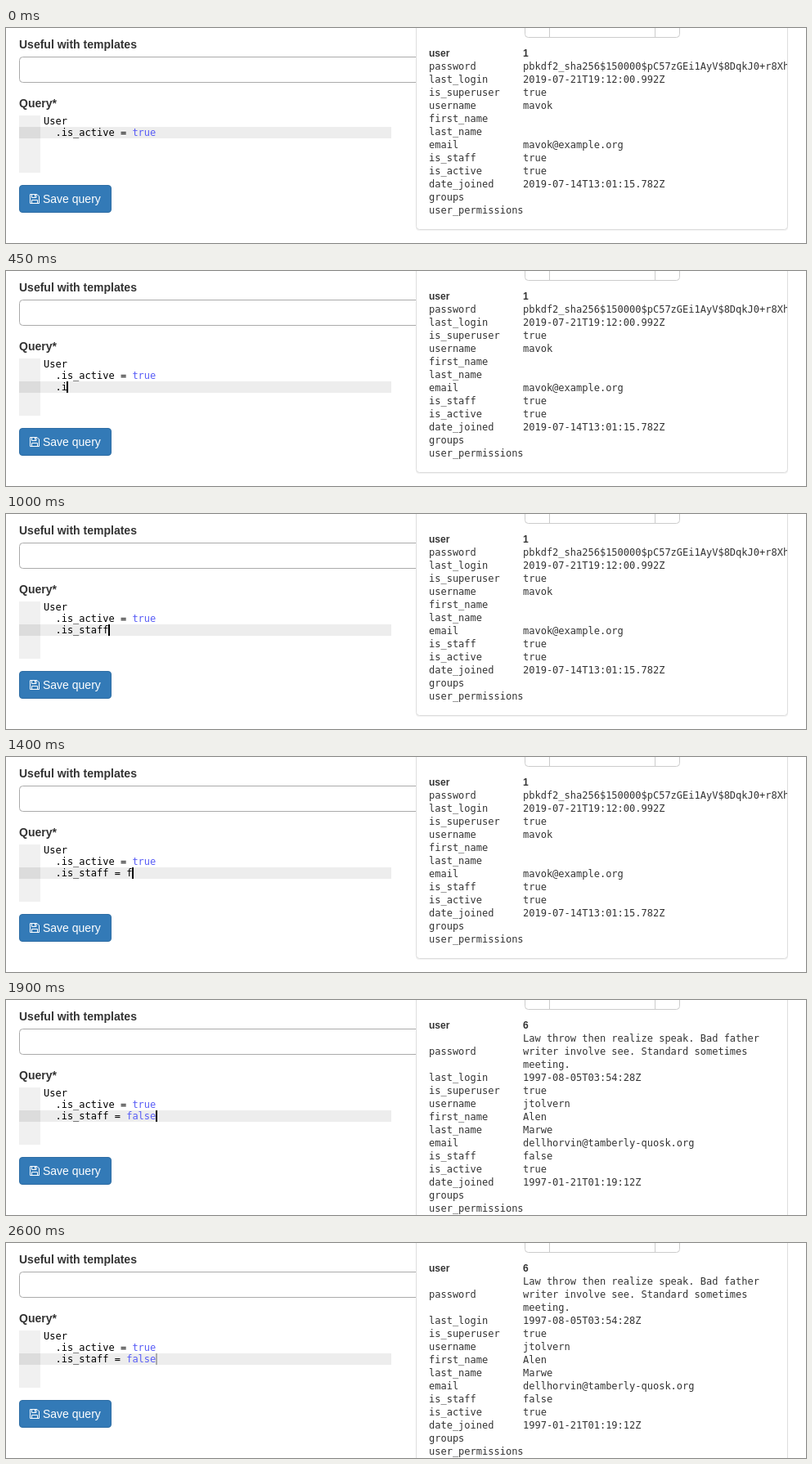
Write an HTML page that moves like this. It is 978 px wide and 263 px high and loops after 3300 ms.

```html
<!DOCTYPE html>
<html lang="en">
<head>
<meta charset="utf-8">
<title>Query editor</title>
<style>
  html, body { margin: 0; width: 100%; height: 100%; overflow: hidden; background: #fff; }
  svg { display: block; width: 100%; height: 100%; }
  text { font: 14px "Liberation Sans", Arial, sans-serif; fill: #333; white-space: pre; }
  .bold { font-weight: bold; }
  .small { font-size: 12px; }
  .mono { font: 12px "DejaVu Sans Mono", monospace; }
  .code { fill: #000; }
  .const { fill: #585cf6; }
</style>
</head>
<body>
<svg viewBox="0 0 978 263">
  <defs><clipPath id="inner"><rect x="502" y="0" width="453" height="263"/></clipPath></defs>

  <text class="bold" x="16" y="25">Useful with templates</text>
  <rect x="16.5" y="35.5" width="520" height="31" rx="4" fill="#fff" stroke="#aaa"/>

  <text class="bold" x="16" y="97">Query*</text>
  <rect x="16" y="107" width="26" height="70" fill="#f0f0f0"/>
  <g id="active">
    <rect x="16" width="26" height="14" fill="#dcdcdc"/>
    <rect x="42" width="429" height="14" fill="#ededed"/>
  </g>
  <text class="mono code" x="46" y="118">User</text>
  <text class="mono code" x="46" y="132">  .is_active = <tspan class="const">true</tspan></text>
  <text class="mono code" x="46" y="146"><tspan id="typed"></tspan><tspan id="literal" class="const"></tspan></text>
  <rect id="cursor" y="135" width="2" height="14" fill="#000"/>

  <rect x="16.5" y="192.5" width="112" height="33" rx="3.5" fill="#337ab7" stroke="#2e6da4"/>
  <g fill="none" stroke="#fff">
    <path d="M29.5 203.5h8.5l2.5 2.5v8.5h-11z"/>
    <path d="M31.5 203.5v4h5.5v-4M31.5 214.5v-4h7v4"/>
    <path d="M35.5 204v2.5"/>
  </g>
  <text x="45" y="214" style="fill:#fff">Save query</text>

  <rect id="shade" x="501" y="-20" width="455" rx="4" fill="#000" fill-opacity=".05"/>
  <rect id="panel" x="501.5" y="-20" width="454" rx="4" fill="#fff" stroke="#ddd"/>
  <rect x="634.5" y="-20" width="189" height="31.5" rx="4" fill="#fff" stroke="#ccc"/>
  <path d="M664.5 0v11.5h129V0" fill="none" stroke="#ccc"/>
  <g id="before" clip-path="url(#inner)"></g>
  <g id="after" clip-path="url(#inner)"></g>
</svg>
<script>
const LOOP = 3300, ENTER = 150, RESULT = 1900;
const CHAR = 7.224, LEFT = 46, INDENT = 2;
const LINE = ".is_staff = false";
const FALSE_AT = LINE.indexOf("false");
// [time, characters typed so far]
const KEYS = [
  [300, 1], [450, 2], [550, 3], [650, 4], [750, 5], [850, 6], [900, 7], [950, 8], [1000, 9],
  [1200, 10], [1250, 12], [1400, 13], [1450, 14], [1550, 15], [1600, 16], [1650, 17]
];
const FIELDS = ["password", "last_login", "is_superuser", "username", "first_name", "last_name",
  "email", "is_staff", "is_active", "date_joined", "groups", "user_permissions"];

const $ = id => document.getElementById(id);

function addText(group, x, y, text, cls) {
  const el = document.createElementNS(group.namespaceURI, "text");
  el.setAttribute("x", x);
  el.setAttribute("y", y);
  el.setAttribute("class", cls);
  el.textContent = text;
  group.append(el);
}

// Lists one record; a multi-line value centres its label.
function addRecord(group, id, values) {
  addText(group, 517, 35, "user", "bold small");
  addText(group, 632, 35, id, "bold small");
  let y = 51;
  FIELDS.forEach((field, i) => {
    const lines = (values[i] || "").split("\n");
    addText(group, 517, y + (lines.length - 1) * 8, field, "mono");
    lines.forEach((line, n) => addText(group, 632, y + n * 16, line, "mono"));
    y += lines.length * 16;
  });
}

addRecord($("before"), "1", [
  "pbkdf2_sha256$150000$pC57zGEi1AyV$8DqkJ0+r8Xh", "2019-07-21T19:12:00.992Z", "true", "mavok",
  "", "", "mavok@example.org", "true", "true", "2019-07-14T13:01:15.782Z"
]);
addRecord($("after"), "6", [
  "Law throw then realize speak. Bad father\nwriter involve see. Standard sometimes\nmeeting.",
  "1997-08-05T03:54:28Z", "true", "jtolvern", "Alen", "Marwe",
  "dellhorvin@tamberly-quosk.org", "false", "true", "1997-01-21T01:19:12Z"
]);

// Soft blink, stepped at the rate of the screen updates.
function cursorOpacity(t) {
  if (t < ENTER) return 0;
  if (t < 2000) return 1;
  if (t < 2150) return 0.4;
  if (t < 2550) return 0;
  return t < 2600 ? 0.08 : 0.28;
}

function draw(t) {
  const count = KEYS.reduce((n, [at, len]) => t >= at ? len : n, 0);
  const done = count === LINE.length;
  const plain = LINE.slice(0, done ? FALSE_AT : count);
  $("typed").textContent = " ".repeat(INDENT) + plain;
  $("literal").textContent = done ? LINE.slice(FALSE_AT) : "";
  $("active").setAttribute("transform", `translate(0 ${t < ENTER ? 121 : 135})`);
  $("cursor").setAttribute("x", Math.floor(LEFT + (INDENT + count) * CHAR));
  $("cursor").setAttribute("opacity", cursorOpacity(t));

  const fresh = t >= RESULT;
  const bottom = fresh ? 278.5 : 246.5;
  $("panel").setAttribute("height", bottom + 20);
  $("shade").setAttribute("height", bottom + 21.5);
  $("before").style.display = fresh ? "none" : "";
  $("after").style.display = fresh ? "" : "none";
}

const start = performance.now();
function tick() {
  draw((performance.now() - start) % LOOP);
  requestAnimationFrame(tick);
}
tick();
</script>
</body>
</html>
```
